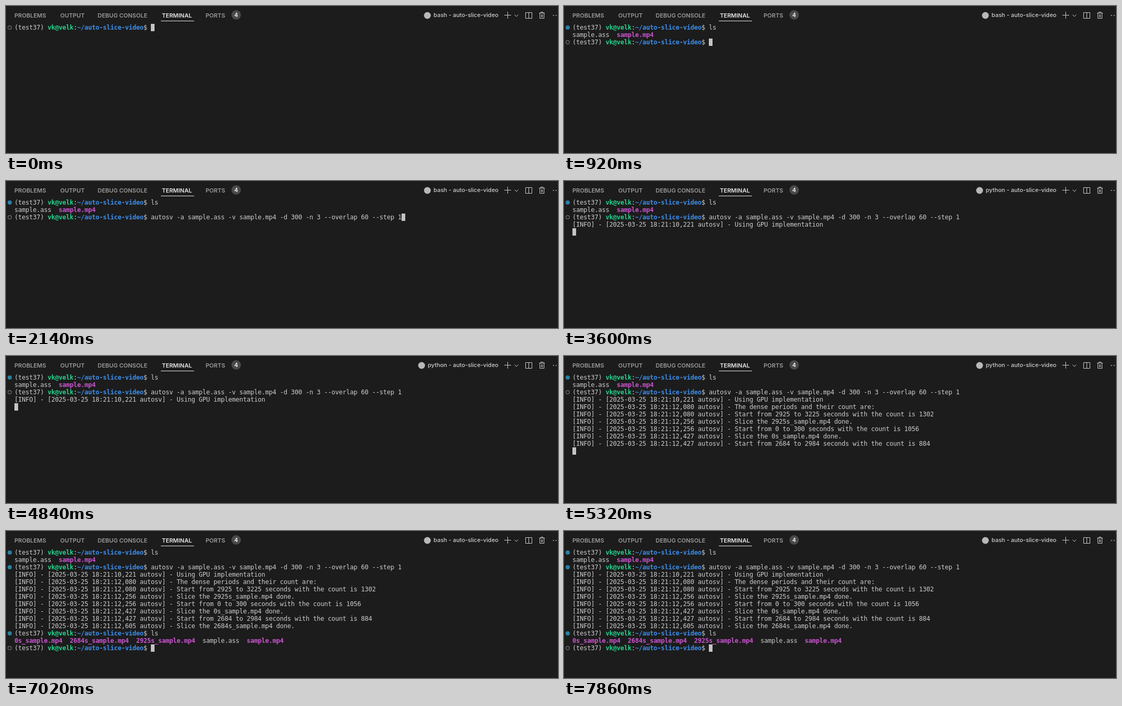
Recreate the animation shown at these times as an HTML page with a canvas. Size 1048 px wide and 280 px high, loop 8.39 s.

```html
<!DOCTYPE html>
<html lang="en">
<head>
<meta charset="utf-8">
<title>Terminal</title>
<style>
  html, body { margin: 0; width: 100%; height: 100%; overflow: hidden; background: #1c1c1c; }
  canvas { display: block; width: 1048px; height: 280px; }
</style>
</head>
<body>
<canvas id="stage"></canvas>
<script>
const W = 1048, H = 280, LOOP = 8390;
const LEFT = 16, TOP = 34, CELL = 7, ROW = 14;
const C = {
  bg: '#1c1c1c', text: '#cccccc', green: '#23d18b', blue: '#3b8eea', magenta: '#c954cf',
  tab: '#9a9a9a', active: '#e7e7e7', badge: '#4a4a4a', done: '#2a7fa3', idle: '#666666'
};
const MONO = '12px "DejaVu Sans Mono", "Liberation Mono", monospace';
const UI = 'Inter, Roboto, sans-serif';

const canvas = document.getElementById('stage');
const ctx = canvas.getContext('2d');
const scale = window.devicePixelRatio || 1;
canvas.width = W * scale;
canvas.height = H * scale;
ctx.scale(scale, scale);

// A line is a list of [text, color, bold] spans.
const plain = s => [[s, C.text]];
const video = s => [s, C.magenta, true];
const PROMPT = [['(test37) ', C.text], ['vk@velk', C.green, true], [':', C.text],
  ['~/auto-slice-video', C.blue, true], ['$ ', C.text]];
const PROMPT_LEN = 37;

const logs = [
  [2740, '10,221', 'Using GPU implementation'],
  [4880, '12,080', 'The dense periods and their count are:'],
  [4880, '12,080', 'Start from 2925 to 3225 seconds with the count is 1302'],
  [5060, '12,256', 'Slice the 2925s_sample.mp4 done.'],
  [5060, '12,256', 'Start from 0 to 300 seconds with the count is 1056'],
  [5240, '12,427', 'Slice the 0s_sample.mp4 done.'],
  [5240, '12,427', 'Start from 2684 to 2984 seconds with the count is 884'],
  [5420, '12,605', 'Slice the 2684s_sample.mp4 done.']
];

const output = [
  [720, 1, [['sample.ass  ', C.text], video('sample.mp4')]],
  ...logs.map(([at, sec, msg], i) =>
    [at, 3 + i, plain(`[INFO] - [2025-03-25 18:21:${sec} autosv] - ${msg}`)]),
  [6800, 12, [video('0s_sample.mp4  2684s_sample.mp4  2925s_sample.mp4'),
    ['  sample.ass  ', C.text], video('sample.mp4')]]
];

const lsKeys = (l, s) => t => t < l ? 0 : t < s ? 1 : 2;
const sliceKeys = t => {
  if (t >= 1560) return 68;
  return t < 960 ? 0 : Math.min(10, 1 + Math.floor((t - 960) / 40));
};

const commands = [
  { row: 0, show: 0, enter: 710, done: 720, text: 'ls', keys: lsKeys(330, 470) },
  { row: 2, show: 720, enter: 2200, done: 5540, keys: sliceKeys,
    text: 'autosv -a sample.ass -v sample.mp4 -d 300 -n 3 --overlap 60 --step 1' },
  { row: 11, show: 5540, enter: 6780, done: 6800, text: 'ls', keys: lsKeys(6360, 6500) },
  { row: 13, show: 6800, enter: Infinity, done: Infinity, text: '', keys: () => 0 }
];

function drawLine(row, spans) {
  let x = LEFT;
  for (const [text, color, bold] of spans) {
    ctx.fillStyle = color;
    ctx.font = (bold ? 'bold ' : '') + MONO;
    for (const ch of text) {
      ctx.fillText(ch, x, TOP + row * ROW + 11);
      x += CELL;
    }
  }
}

function dot(x, y, r, color) {
  ctx.fillStyle = color;
  ctx.beginPath();
  ctx.arc(x, y, r, 0, Math.PI * 2);
  ctx.fill();
}

function ring(x, y, r, color) {
  ctx.strokeStyle = color;
  ctx.lineWidth = 1.4;
  ctx.beginPath();
  ctx.arc(x, y, r, 0, Math.PI * 2);
  ctx.stroke();
}

function stroke(path) {
  ctx.strokeStyle = C.text;
  ctx.lineWidth = 1;
  ctx.stroke(new Path2D(path));
}

function label(text, x, y, color, weight, align = 'left') {
  ctx.font = `${weight} 11px ${UI}`;
  ctx.fillStyle = color;
  ctx.textAlign = align;
  ctx.fillText(text, x, y);
  ctx.textAlign = 'left';
}

function drawHeader(shell) {
  const tabs = [['PROBLEMS', 16], ['OUTPUT', 103], ['DEBUG CONSOLE', 174], ['TERMINAL', 296], ['PORTS', 379]];
  for (const [name, x] of tabs) label(name, x, 22, name === 'TERMINAL' ? C.active : C.tab, 600);
  ctx.fillStyle = C.active;
  ctx.fillRect(294, 28, 63, 1);
  dot(437, 17, 9, C.badge);
  label('4', 437, 21, '#f0f0f0', 600, 'center');

  dot(shell === 'bash' ? 800 : 789, 18, 6.5, '#b8b8b8');
  label(shell + ' - auto-slice-video', 935, 21, C.text, 500, 'right');

  stroke('M946 17.5H959M952.5 11V24');
  stroke('M965.5 16.5L969 20L972.5 16.5');
  stroke('M986.5 12.5H998.5V23.5H986.5ZM992.5 12.5V23.5');
  stroke('M1012 13.5H1023M1015.5 13V11.5H1019.5V13M1013.5 13.5V23.5H1021.5V13.5M1016.5 16V21.5M1018.5 16V21.5');
  dot(1039.5, 18, 0.9, C.text);
  dot(1044.5, 18, 0.9, C.text);
}

function drawCursor(row, col) {
  ctx.fillStyle = '#c4c4c4';
  ctx.fillRect(LEFT + col * CELL, TOP + row * ROW, CELL, ROW);
}

function draw(t) {
  ctx.fillStyle = C.bg;
  ctx.fillRect(0, 0, W, H);
  drawHeader(t >= 2320 && t < 5680 ? 'python' : 'bash');

  const lines = output.filter(([at]) => t >= at);
  for (const [, row, spans] of lines) drawLine(row, spans);

  for (const cmd of commands) {
    if (t < cmd.show) break;
    const n = cmd.keys(t);
    drawLine(cmd.row, [...PROMPT, [cmd.text.slice(0, n), C.text]]);
    const y = TOP + cmd.row * ROW + 7;
    if (t >= cmd.done) dot(7, y, 4, C.done);
    else ring(7, y, 3.3, C.idle);

    if (t < cmd.enter) drawCursor(cmd.row, PROMPT_LEN + n);
    else if (t < cmd.done) {
      const printed = lines.filter(([, row]) => row > cmd.row).length;
      drawCursor(cmd.row + 1 + printed, 0);
    }
  }
}

const start = performance.now();
function tick() {
  draw((performance.now() - start) % LOOP);
  requestAnimationFrame(tick);
}
tick();
</script>
</body>
</html>
```
